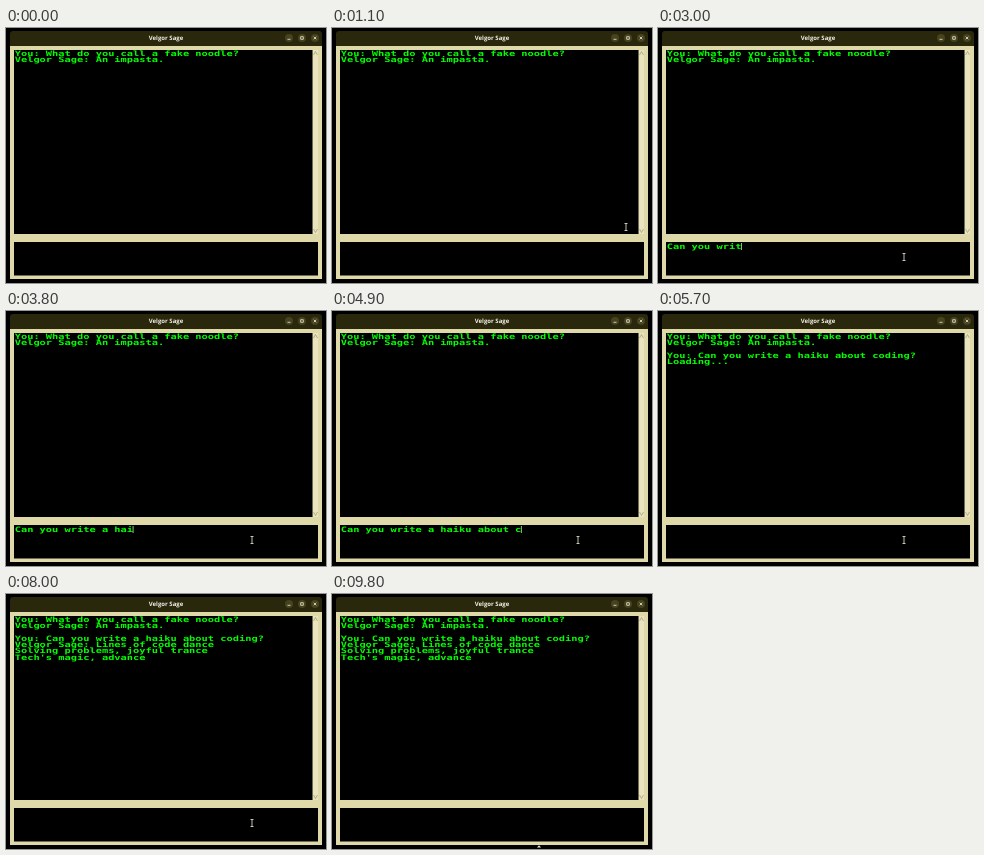
Write an HTML page that moves like this. It is 320 px wide and 255 px high and loops after 10000 ms.

```html
<!DOCTYPE html>
<html lang="en">
<head>
<meta charset="utf-8">
<title>Chat window</title>
<style>
  html, body { margin: 0; width: 100%; height: 100%; overflow: hidden; background: #000; }
  svg { display: block; width: 100vw; height: 100vh; }
  text { white-space: pre; text-rendering: geometricPrecision; }
  .title { font: bold 6px "Open Sans", sans-serif; fill: #f4f2e4; text-anchor: middle; }
  .wide { font: bold 7.4px "DejaVu Sans Mono", monospace; fill: #0f0; }
  .line { fill: none; stroke: #f0eedc; stroke-width: .8; }
</style>
</head>
<body>
<svg viewBox="0 0 320 255">
  <rect width="320" height="255"/>
  <path d="M4 18V6q0-3 3-3H313q3 0 3 3V18z" fill="#29270c"/>
  <text class="title" x="160" y="12.3">Velgor Sage</text>
  <g fill="#46431e">
    <circle cx="283" cy="10" r="4"/>
    <circle cx="296" cy="10" r="4"/>
    <circle cx="309" cy="10" r="4"/>
  </g>
  <path class="line" d="M281.5 11.3h3M294.7 8.7h2.6v2.6h-2.6zM307.7 8.7l2.6 2.6m0-2.6l-2.6 2.6"/>

  <rect x="4" y="18" width="312" height="233" fill="#dfd9aa"/>
  <rect x="8" y="22" width="298.5" height="184"/>
  <rect x="307" y="22" width="5" height="184" fill="#e9e4bd"/>
  <path d="M307.5 27l2-3.5 2 3.5M307.5 201l2 3.5 2-3.5" fill="none" stroke="#8f8b62" stroke-width=".6"/>
  <rect x="8" y="214" width="304" height="33.5"/>

  <g id="chat"></g>
  <g id="input"></g>
  <rect id="caret" y="215" width="1" height="7" fill="#7fd070"/>
  <path id="beam" d="M-1.5-3.5h3M0-3.5v7M-1.5 3.5h3" class="line"/>
  <path id="tip" d="M-2 1.2L0-1 2 1.2z" fill="#f0eedc"/>
</svg>
<script>
const LOOP = 10000, STEP = 100, ADVANCE = 6.23, LEFT = 8.7, ROW = 6.25;
const QUESTION = "Can you write a haiku about coding?";
const OPENING = ["You: What do you call a fake noodle?", "Velgor Sage: An impasta.", ""];
const ASKED = [...OPENING, "You: " + QUESTION];
const WAITING = [...ASKED, "Loading..."];
const ANSWERED = [...ASKED, "Velgor Sage: Lines of code dance",
  "Solving problems, joyful trance", "Tech's magic, advance"];

const SENT = 5700, REPLIED = 8000;
const CARET_ON = [[2100, SENT], [6300, 6600], [7100, 7500], [8300, 8600]];
// Pointer stops: time, x, y
const POINTER = [[200, 301, 258], [500, 294, 199], [1200, 294, 199], [1600, 246, 229],
  [9000, 246, 229], [9800, 207, 252.3]];

const $ = id => document.getElementById(id);

// Writes rows in the wide face, first baseline at y.
function write(group, rows, y) {
  const key = rows.join("\n");
  if (group.dataset.key === key) return;
  group.dataset.key = key;
  group.replaceChildren(...rows.map((row, i) => {
    const el = document.createElementNS("http://www.w3.org/2000/svg", "text");
    el.setAttribute("class", "wide");
    el.setAttribute("transform", `translate(${LEFT} ${y + i * ROW}) scale(1.4 1)`);
    el.textContent = row;
    return el;
  }));
}

// One key per step, with two short pauses.
function typedCount(t) {
  if (t >= SENT) return 0;
  const n = t / STEP - 18 - (t >= 3200) - (t >= 4400);
  return Math.max(0, Math.min(QUESTION.length, n));
}

function pointerAt(t) {
  const i = POINTER.findIndex(p => p[0] >= t);
  if (i < 1) return i ? POINTER.at(-1).slice(1) : [-20, -20];
  const [t0, x0, y0] = POINTER[i - 1], [t1, x1, y1] = POINTER[i];
  const k = (t - t0) / (t1 - t0);
  return [x0 + (x1 - x0) * k, y0 + (y1 - y0) * k];
}

function show(el, visible) {
  el.setAttribute("visibility", visible ? "visible" : "hidden");
}

function draw(now) {
  const t = Math.floor(now % LOOP / STEP) * STEP;
  const count = typedCount(t);
  write($("chat"), t < SENT ? OPENING : t < REPLIED ? WAITING : ANSWERED, 28.1);
  write($("input"), [QUESTION.slice(0, count)], 220.6);

  $("caret").setAttribute("x", LEFT - .5 + count * ADVANCE);
  show($("caret"), CARET_ON.some(([a, b]) => t >= a && t < b));

  const [x, y] = pointerAt(t);
  for (const id of ["beam", "tip"]) $(id).setAttribute("transform", `translate(${x} ${y})`);
  show($("beam"), y < 248);
  show($("tip"), y >= 248);
}

function frame() {
  draw(performance.now());
  requestAnimationFrame(frame);
}
frame();
</script>
</body>
</html>
```
